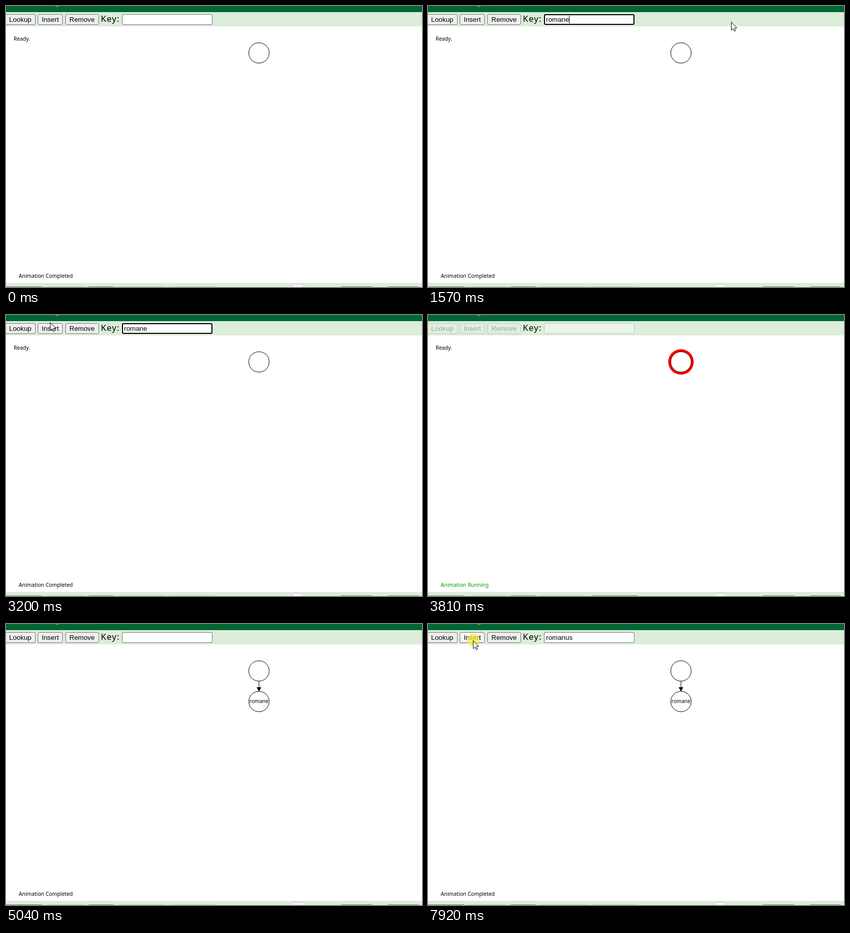
An HTML page with a canvas that plays this animation: 814 px wide and 551 px high, repeating every 7.99 s.

```html
<!DOCTYPE html>
<html lang="en">
<head>
<meta charset="utf-8">
<title>Radix tree demo</title>
<style>
  html, body { margin: 0; width: 100%; height: 100%; overflow: hidden; background: #fff; }
  canvas { display: block; }
</style>
</head>
<body>
<canvas id="stage" width="814" height="551"></canvas>
<script>
const ctx = document.getElementById('stage').getContext('2d');
const LOOP = 7990;
const UI = '13.333px "Liberation Sans", Arial, sans-serif';
const LABEL = '10.3px "Noto Sans", sans-serif';
const PALE = '#dcedda';

// Bursts of motion: first step, last step, number of steps
const bursts = [
  [0, 0, 1], [500, 1020, 8], [1190, 1730, 8], [2030, 2800, 11], [2970, 3740, 11],
  [3810, 4590, 11], [4670, 5040, 6], [6130, 6210, 2], [6450, 6750, 5],
  [6910, 6910, 1], [7060, 7520, 7], [7750, 7750, 1], [7920, 7920, 1]
];

// Pointer: time, shape, x, y
const pointer = [
  [0, ''],
  [500, 'arrow', 763, 91], [720, 'arrow', 420, 36], [795, 'beam', 300, 25], [1020, 'beam', 300, 25],
  [1190, 'arrow', 440, 28], [1345, 'arrow', 675, 28], [1570, 'arrow', 593, 31],
  [2030, 'arrow', 593, 31], [2260, 'arrow', 624, 113], [2570, 'arrow', 520, 40], [2800, 'arrow', 400, 4],
  [2970, 'arrow', 300, 4], [3120, 'arrow', 110, 9], [3200, 'arrow', 86, 14], [3350, 'arrow', 88, 30],
  [3580, ''],
  [6130, 'arrow', 756, 50], [6205, ''],
  [6450, 'arrow', 461, 9], [6675, 'arrow', 264, 6], [6745, 'beam', 256, 22], [6905, 'beam', 264, 25],
  [7200, 'beam', 264, 25], [7285, 'arrow', 200, 30], [7440, 'arrow', 115, 35], [7515, 'arrow', 98, 36],
  [7745, 'arrow', 98, 36], [7750, 'arrow', 88, 32], [LOOP, 'arrow', 88, 32]
];

const within = (t, a, b) => t >= a && t < b;

function snap(t) {
  const [a, b, n] = bursts.filter(s => s[0] <= t).pop();
  const step = (b - a) / (n - 1) || 1;
  return a + Math.min(n - 1, Math.floor((t - a + 8) / step)) * step;
}

function pointerAt(t) {
  const i = pointer.findLastIndex(k => k[0] <= t);
  const [ta, shape, xa, ya] = pointer[i];
  const [tb, next, xb, yb] = pointer[i + 1] || pointer[i];
  const f = next && tb > ta ? (t - ta) / (tb - ta) : 0;
  return { shape, x: Math.round(xa + ((xb - xa) * f || 0)), y: Math.round(ya + ((yb - ya) * f || 0)) };
}

function rect(color, x, y, w, h) {
  ctx.fillStyle = color;
  ctx.fillRect(x, y, w, h);
}

function box(x, y, w, h, r, fill, stroke, line = 1) {
  ctx.beginPath();
  ctx.roundRect(x + line / 2, y + line / 2, w - line, h - line, r);
  ctx.fillStyle = fill;
  ctx.fill();
  ctx.strokeStyle = stroke;
  ctx.lineWidth = line;
  ctx.stroke();
}

function text(str, x, y, font, color = '#000', align = 'left') {
  ctx.font = font;
  ctx.textAlign = align;
  ctx.fillStyle = color;
  ctx.fillText(str, x, y);
}

function disc(x, y, r, fill, stroke) {
  ctx.beginPath();
  ctx.arc(x, y, r, 0, 7);
  ctx.fillStyle = fill;
  ctx.fill();
  if (stroke) {
    ctx.strokeStyle = stroke;
    ctx.lineWidth = 1;
    ctx.stroke();
  }
}

function poly(points, fill, stroke) {
  ctx.beginPath();
  points.forEach(([x, y]) => ctx.lineTo(x, y));
  ctx.closePath();
  ctx.fillStyle = fill;
  ctx.fill();
  if (stroke) {
    ctx.strokeStyle = stroke;
    ctx.lineWidth = 1;
    ctx.stroke();
  }
}

function button(label, x, w, off, pressed) {
  ctx.globalAlpha = off ? 0.3 : 1;
  box(x, 16, w, 21, 2.5, pressed ? '#f5f5f5' : '#efefef', '#767676');
  text(label, x + 8, 31, UI);
  ctx.globalAlpha = 1;
}

function toolbar(t, running) {
  rect('#006633', 0, 0, 814, 12);
  rect('#d9a35c', 97, 0, 6, 1);
  rect(PALE, 0, 12, 814, 28);
  button('Lookup', -2, 60, running);
  button('Insert', 62, 49, running, within(t, 3430, 3500) || t >= 7920);
  button('Remove', 116, 66, running);
  ctx.letterSpacing = '1px';
  text('Key:', 185.5, 31, '17px "Noto Sans", sans-serif');
  ctx.letterSpacing = '0px';
  keyField(t, running);
}

function keyField(t, running) {
  const focused = within(t, 860, 3430) || within(t, 7050, 7920);
  const typed = (word, start, step) => word.slice(0, Math.max(0, Math.floor((t - start + 8) / step) + 1));
  const value = within(t, 1180, 3500) ? typed('romane', 1190, 77) : t >= 7050 ? typed('romanus', 7060, 76.7) : '';
  if (focused) box(227, 16, 177, 21, 2, '#fff', '#000', 2);
  else box(227, 16, 177, 21, 1.5, running ? '#ecf3eb' : '#fff', running ? '#bccabb' : '#767676');
  text(value, 231, 31, UI);
  const caretOn = !within(t, 2030, 2550) && !within(t, 3040, 3430);
  if (focused && caretOn) rect('#000', Math.round(231 + ctx.measureText(value).width), 19, 1, 15);
}

function footer(running) {
  rect(PALE, 0, 543, 814, 8);
  const dark = '#767676', light = '#bdcabb';
  [[-4, 76, dark], [79, 76, light], [160, 52, dark], [218, 94, light],
   [319, 93, running ? dark : light], [654, 64, dark], [746, 63, dark]]
    .forEach(([x, w, line]) => box(x, 550, w, 21, 2.5, '#efefef', line));
  rect('#eaf0e9', 418, 550, 203, 1);
  box(560, 545, 23, 20, 3, '#f6f6f6', '#c4c8c4');
}

function tree(t) {
  if (within(t, 3500, 4810)) {
    const glow = 3 + Math.abs(((t - 3500) / 155) % 8 - 4);
    disc(495, 92, 20 + glow, '#f00');
  }
  disc(495, 92, 20, '#fff', '#000');
  if (t < 4735) return;
  disc(495, 152, 20, '#fff', '#000');
  text('romane', 495, 155, '10.1px "Noto Sans", sans-serif', '#000', 'center');
  rect('#000', 494.5, 112, 1, 14);
  poly([[490.5, 124], [499.5, 124], [495, 132.5]], '#000');
}

function drawPointer(t) {
  const { shape, x, y } = pointerAt(t);
  if (within(t, 3430, 3580) || t >= 7920) disc(x + 0.5, y - 0.5, 12, 'rgba(250,236,60,.72)');
  if (shape === 'arrow') {
    const outline = [[0, 0], [0, 16], [3.5, 12.7], [6, 18], [8.3, 17], [6, 11.7], [11, 11.4]];
    poly(outline.map(([dx, dy]) => [x + dx + 0.5, y + dy + 0.5]), '#fff', '#000');
  } else if (shape === 'beam') {
    rect('#000', x, y - 7, 1, 15);
    for (const dy of [-8, 8]) {
      rect('#000', x - 3, y + dy, 3, 1);
      rect('#000', x + 1, y + dy, 3, 1);
    }
  }
}

function draw() {
  const t = snap(performance.now() % LOOP);
  const running = within(t, 3500, 5030);
  rect('#fff', 0, 0, 814, 551);
  toolbar(t, running);
  if (t < 4270) text('Ready.', 15, 68, LABEL);
  tree(t);
  text(running ? 'Animation Running' : 'Animation Completed', 25, 533, LABEL, running ? '#090' : '#000');
  footer(running);
  drawPointer(t);
  requestAnimationFrame(draw);
}
draw();
</script>
</body>
</html>
```
